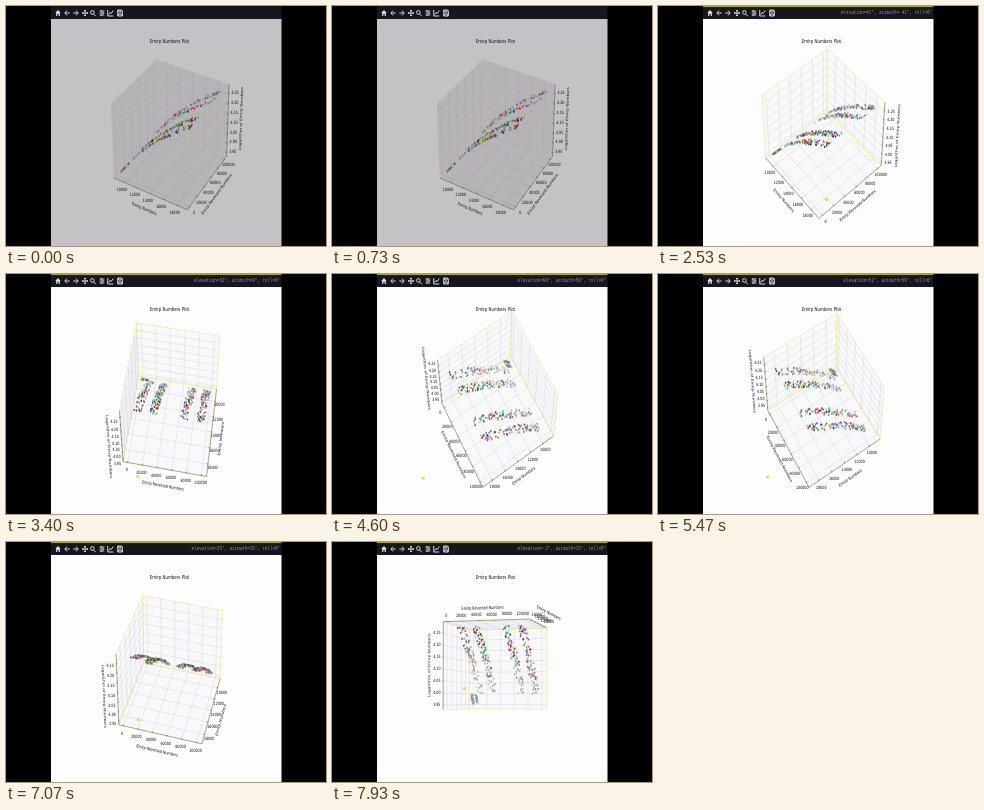
Write an HTML page with a canvas that moves like this. It is 320 px wide and 240 px high and loops after 8000 ms.

```html
<!DOCTYPE html>
<html lang="en">
<head>
<meta charset="utf-8">
<title>Emirp Numbers Plot</title>
<style>
  html, body { margin: 0; width: 100%; height: 100%; overflow: hidden; background: #000; }
  canvas { display: block; width: 320px; height: 240px; }
</style>
</head>
<body>
<canvas id="stage"></canvas>
<script>
const canvas = document.getElementById('stage');
const ctx = canvas.getContext('2d');
const ratio = window.devicePixelRatio || 1;
canvas.width = 320 * ratio;
canvas.height = 240 * ratio;

const LOOP = 8000, DRAG_START = 1700, HOVER_START = 1000, WHITE_START = 1800;
const SQUEEZE = 0.75;            // the picture is narrowed horizontally
const CENTER = [165.2, 125.1];
const ZOOM = 946, DISTANCE = 10, PT = 0.44;
const SANS = '"DejaVu Sans", sans-serif';
const MONO = '"DejaVu Sans Mono", monospace';

// time, elevation, azimuth
const VIEWS = [
  [0, 30, -60], [DRAG_START, 30, -60], [2530, 42, -41], [3400, 52, 9],
  [4600, 60, 59], [4950, 47, 84], [6200, 59, 16], [7930, -2, 15], [8200, -9, 15]
];

const isPrime = n => {
  for (let d = 2; d * d <= n; d++) if (n % d === 0) return false;
  return n > 1;
};
const reverse = n => +String(n).split('').reverse().join('');

let seed = 7;
const random = () => (seed = (seed * 16807) % 2147483647) / 2147483647;

const emirps = [];
for (let n = 9001; n < 18800; n += 2) {
  const r = reverse(n);
  if (r !== n && isPrime(n) && isPrime(r)) {
    const rgb = [0, 0, 0].map(() => Math.round(random() * 235));
    emirps.push({ at: [n, r, Math.log10(n)], color: `rgb(${rgb})` });
  }
}

const range = (from, step, count) => Array.from({ length: count }, (_, i) => from + i * step);
const axes = [
  { label: 'Emirp Numbers', ticks: range(10000, 2000, 5), size: 1.143, flip: 1, tickDir: 1 },
  { label: 'Emirp Reversed Numbers', ticks: range(0, 20000, 6), size: 1.143, flip: 0, tickDir: 0 },
  { label: 'Logarithm of Emirp Numbers', ticks: range(3.95, 0.05, 7), size: 0.857, flip: 0, tickDir: 0, digits: 2 }
];
axes.forEach((axis, i) => {
  const values = emirps.map(e => e.at[i]);
  const min = Math.min(...values), max = Math.max(...values);
  axis.mid = (min + max) / 2;
  axis.unit = axis.size / ((max - min) * 1.1);
  axis.half = axis.size / 2 * 25 / 24;
});
const place = (value, i) => (value - axes[i].mid) * axes[i].unit;
emirps.forEach(e => { e.box = e.at.map(place); });

// Monotone cubic interpolation through the view keys
function track(t, col) {
  let i = 0;
  while (i < VIEWS.length - 2 && t > VIEWS[i + 1][0]) i++;
  const rate = k => k < 0 || k > VIEWS.length - 2 ? 0
    : (VIEWS[k + 1][col] - VIEWS[k][col]) / (VIEWS[k + 1][0] - VIEWS[k][0]);
  const slope = k => {
    const a = rate(k - 1), b = rate(k);
    return a * b > 0 ? 2 * a * b / (a + b) : 0;
  };
  const [p, q] = [VIEWS[i], VIEWS[i + 1]];
  const span = q[0] - p[0], s = Math.min(1, (t - p[0]) / span), r = 1 - s;
  return p[col] * (1 + 2 * s) * r * r + q[col] * s * s * (3 - 2 * s)
    + span * s * r * (slope(i) * r - slope(i + 1) * s);
}

function camera(elevation, azimuth) {
  const e = elevation * Math.PI / 180, a = azimuth * Math.PI / 180;
  const [se, ce, sa, ca] = [Math.sin(e), Math.cos(e), Math.sin(a), Math.cos(a)];
  const eye = [ce * ca, ce * sa, se];
  const project = ([x, y, z]) => {
    const depth = x * eye[0] + y * eye[1] + z * eye[2];
    const k = ZOOM / (DISTANCE - depth);
    return [(y * ca - x * sa) * k, CENTER[1] - (z * ce - (x * ca + y * sa) * se) * k, depth];
  };
  return { eye, project };
}

function path(points, color, width, fill) {
  ctx.beginPath();
  points.forEach(p => ctx.lineTo(p[0], p[1]));
  if (fill) {
    ctx.closePath();
    ctx.fillStyle = fill;
    ctx.fill();
  }
  ctx.strokeStyle = color;
  ctx.lineWidth = width;
  ctx.stroke();
}

function text(str, x, y, size, angle = 0) {
  ctx.save();
  ctx.translate(x, y);
  ctx.rotate(angle);
  ctx.font = `${size}px ${SANS}`;
  ctx.textAlign = 'center';
  ctx.textBaseline = 'middle';
  ctx.fillStyle = '#111';
  ctx.fillText(str, 0, 0);
  ctx.restore();
}

const withValue = (point, i, value) => point.map((v, k) => k === i ? value : v);

function drawPlot(elevation, azimuth, white) {
  const { eye, project } = camera(elevation, azimuth);
  const far = axes.map((axis, i) => eye[i] > 0 ? -axis.half : axis.half);
  const flipped = (point, i) => withValue(point, i, -point[i]);
  const line = (points, color, width) => path(points.map(project), color, width);
  const outward = (point, skip, amount) => point.map((v, k) =>
    k === skip ? v : v + Math.sign(v) * axes[k].size * amount);

  axes.forEach((_, i) => {
    const [j, k] = [0, 1, 2].filter(n => n !== i);
    const corners = [far, flipped(far, j), flipped(flipped(far, j), k), flipped(far, k)];
    path(corners.map(project), white ? '#ece98c' : '#b9b7b9', white ? 0.7 : 0.5,
      white ? 'rgba(236,236,240,.25)' : 'rgba(60,60,60,.1)');
  });

  axes.forEach((axis, i) => {
    const [j, k] = [0, 1, 2].filter(n => n !== i);
    axis.ticks.forEach(tick => {
      const base = withValue(far, i, place(tick, i));
      line([flipped(base, j), base, flipped(base, k)], white ? '#c6c6dc' : '#a09ea2', 0.4);
    });
  });

  axes.forEach((axis, i) => {
    const edge = flipped(far, axis.flip);
    const start = project(withValue(edge, i, -axis.half));
    const end = project(withValue(edge, i, axis.half));
    path([start, end], '#222', 0.4);

    axis.ticks.forEach(tick => {
      const at = withValue(edge, i, place(tick, i));
      const d = axis.tickDir, step = Math.sign(at[d]) * axes[d].size / 12;
      line([withValue(at, d, at[d] - step * 0.2), withValue(at, d, at[d] + step * 0.1)], '#222', 0.4);
      const [x, y] = project(outward(at, i, 0.058));
      text(tick.toFixed(axis.digits || 0), x, y, 10 * PT);
    });

    let angle = Math.atan2(end[1] - start[1], end[0] - start[0]);
    if (angle >= Math.PI / 2) angle -= Math.PI;
    if (angle < -Math.PI / 2 - 0.01) angle += Math.PI;
    const [x, y] = project(outward(withValue(edge, i, 0), i, 0.1263));
    text(axis.label, x, y, 10 * PT, angle);
  });

  const dots = emirps.map(e => ({ p: project(e.box), color: e.color }));
  dots.sort((a, b) => a.p[2] - b.p[2]);
  dots.forEach(({ p, color }, i) => {
    ctx.globalAlpha = 0.35 + 0.65 * i / dots.length;
    ctx.fillStyle = color;
    ctx.beginPath();
    ctx.arc(p[0], p[1], 1.1, 0, 7);
    ctx.fill();
  });
  ctx.globalAlpha = 1;
}

const ICONS = [
  [52, 'M-3 0L0-3L3 0H2V3H.7V1H-.7V3H-2V0Z', true],
  [61, 'M3 0H-2M0-2.4L-2.4 0L0 2.4'],
  [70, 'M-3 0H2M0-2.4L2.4 0L0 2.4'],
  [79, 'M-3 0H3M0-3V3M-1-2L0-3L1-2M-1 2L0 3L1 2M-2-1L-3 0L-2 1M2-1L3 0L2 1'],
  [87, 'M1.2-.6A1.9 1.9 0 1 1-2.6-.6A1.9 1.9 0 1 1 1.2-.6M.6.8L3 3.2'],
  [96, 'M-2.5-2H2.5M-2.5 0H2.5M-2.5 2H2.5M-1-2.8V-1.2M1-.8V.8M-1 1.2V2.8'],
  [104.5, 'M-3-3V3H3M-2 1.5L-.5-.5L.7.5L3-2.5'],
  [114, 'M-2.5-3H1.7L2.6-2V3H-2.5ZM-1.4-3V-1H1.2V-3M-1.4 3V.8H1.4V3']
].map(([x, d, solid]) => ({ x, shape: new Path2D(d), solid }));

function drawToolbar(status, white) {
  ctx.fillStyle = '#15161f';
  ctx.fillRect(45, 0, 230.5, 13);
  if (white) {
    ctx.fillStyle = '#d2c83c';
    ctx.fillRect(45, 0, 230.5, 0.8);
  }
  ctx.fillStyle = ctx.strokeStyle = '#dcdcea';
  ctx.lineWidth = 1;
  ICONS.forEach(({ x, shape, solid }) => {
    ctx.save();
    ctx.translate(x, 7);
    ctx.scale(0.92, 1);
    if (solid) ctx.fill(shape); else ctx.stroke(shape);
    ctx.restore();
  });
  ctx.save();
  ctx.translate(274, 7);
  ctx.scale(SQUEEZE, 1);
  ctx.font = `5.6px ${MONO}`;
  ctx.textAlign = 'right';
  ctx.textBaseline = 'middle';
  ctx.fillStyle = '#8e8ea6';
  ctx.fillText(status, 0, 0);
  ctx.restore();
}

function drawPointer(t) {
  const ahead = Math.min(t + 150, LOOP);
  const x = 187 - (track(ahead, 2) + 60) / 1.374;
  const y = 180 + (track(ahead, 1) - 30) * 0.972;
  const away = Math.max(0, 1 - (t - HOVER_START) / 400);
  ctx.fillStyle = 'rgba(244,214,70,.9)';
  ctx.beginPath();
  ctx.arc(x + 14 * away, y + 20 * away, 1.7, 0, 7);
  ctx.fill();
}

function statusAt(t, elevation, azimuth) {
  if (t < HOVER_START) return '';
  if (t < DRAG_START) return 'x=14952.0169, y=-1024.2792, z=4.0302';
  return `elevation=${Math.round(elevation)}°, azimuth=${Math.round(azimuth)}°, roll=0°`;
}

function draw() {
  const t = performance.now() % LOOP;
  const white = t >= WHITE_START;
  const elevation = track(t, 1), azimuth = track(t, 2);

  ctx.setTransform(ratio, 0, 0, ratio, 0, 0);
  ctx.fillStyle = '#000';
  ctx.fillRect(0, 0, 320, 240);
  ctx.fillStyle = white ? '#fdfdfd' : '#c5c2c5';
  ctx.fillRect(45, 13, 230.5, 227);

  ctx.save();
  ctx.translate(CENTER[0], 0);
  ctx.scale(SQUEEZE, 1);
  drawPlot(elevation, azimuth, white);
  text('Emirp Numbers Plot', -2.4, 35.7, 12 * PT);
  ctx.restore();

  drawToolbar(statusAt(t, elevation, azimuth), white);
  if (t >= HOVER_START) drawPointer(t);
  requestAnimationFrame(draw);
}
draw();
</script>
</body>
</html>
```
